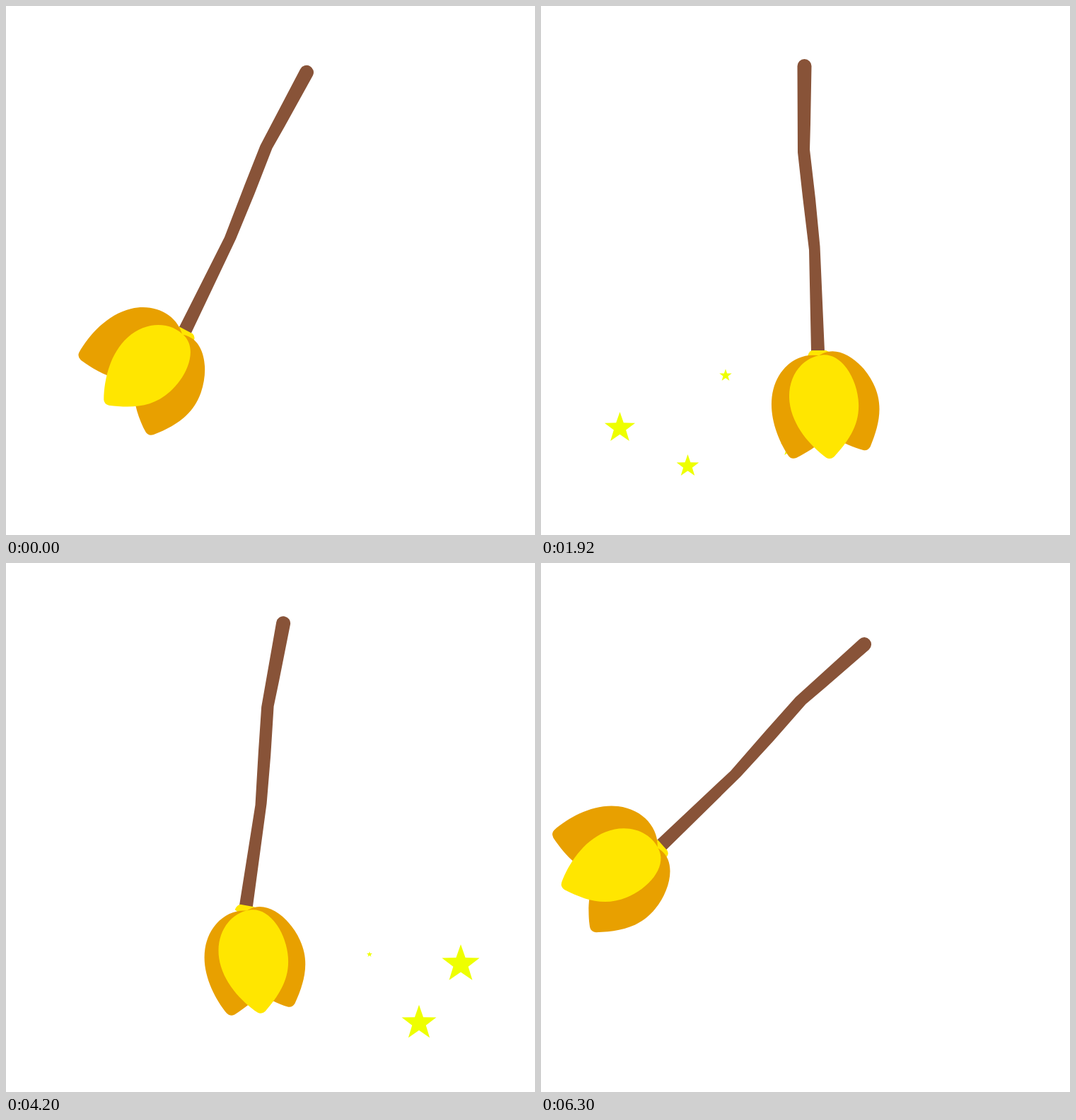
Recreate the animation shown at these times as an HTML page. Size 748x748 px, loop 6.42 s.

```html
<!DOCTYPE html>
<html lang="en">
<head>
<meta charset="utf-8">
<title>Sweeping broom</title>
<style>
  html, body { margin: 0; width: 100%; height: 100%; overflow: hidden; background: #fff; }
  svg { display: block; width: 100vw; height: 100vh; }
</style>
</head>
<body>
<svg viewBox="0 0 748 748">
  <defs>
    <path id="petal" d="M5 4C-24 4-48 30-48 65C-48 99-25 131-5 149Q0 153 6 149C30 128 49 106 49 72C49 38 31 4 5 4Z"/>
  </defs>
  <g id="stars" fill="#eeff00"></g>
  <g id="broom">
    <path fill="#885338" d="M362.5 85A10 10 0 0 1 382.5 85L381 167L380 203L388 272L394.5 340L401 488.500H382L379 345L370 270L363 207Z"/>
    <path fill="#ffe600" d="M383 487H403Q409 489 409 495L400 500H386L377 496Q378 489 383 487Z"/>
    <g transform="translate(392 490)">
      <use id="left" href="#petal" fill="#e8a000"/>
      <use id="right" href="#petal" fill="#e8a000"/>
      <use id="middle" href="#petal" fill="#ffe600"/>
    </g>
  </g>
</svg>
<script>
const LOOP = 6420, SWING = 16;

// Degrees for each step of one swing; positive is to the right.
const handle = [-27.9, -18, -9, 0, 12.5, 25.5, 33.5, 37.7, 39.1, 15, -10.2, -27.9, -38, -44, -47, -48];
const bristles = [-20.3, -13, -4, 6.3, 16, 24, 29.5, 32, 32, 26, 18.3, 10, 0, -9, -16, -20];

// x, y, step at which the star is largest
const stars = [
  [111.5, 594.5, 4.4], [207.5, 649, 5], [261, 521.5, 5.6], [353, 621.5, 5.15],
  [514, 553, 7.03], [584, 648, 9], [643, 564.5, 10.55]
];

const $ = id => document.getElementById(id);
const turn = (id, deg, rest = '') => $(id).setAttribute('transform', `rotate(${-deg}${rest}`);

function starPath() {
  const points = Array.from({ length: 10 }, (_, i) => {
    const r = i % 2 ? 0.4 : 1, a = i * Math.PI / 5;
    return `${(r * Math.sin(a)).toFixed(3)} ${(0.0955 - r * Math.cos(a)).toFixed(3)}`;
  });
  return `M${points.join('L')}Z`;
}

const starNodes = stars.map(() => {
  const node = document.createElementNS('http://www.w3.org/2000/svg', 'path');
  node.setAttribute('d', starPath());
  return $('stars').appendChild(node);
});

// Steps last 120, 90 and 90 ms in turn.
function stepAt(ms) {
  const rest = ms % 300;
  return 3 * Math.floor(ms / 300) + (rest >= 120) + (rest >= 210);
}

function draw(step) {
  const phase = step % SWING, bend = bristles[phase];
  const spread = 22.4 - 0.32 * bend;
  turn('broom', handle[phase], ' 381 195)');
  turn('left', bend - spread, ') scale(1.02)');
  turn('right', bend + spread, ') scale(1.02)');
  turn('middle', bend, ')');

  stars.forEach(([x, y, peak], i) => {
    const d = Math.abs(phase - peak) / 3.27;
    const size = d < 1 ? 29 * Math.cos(d * Math.PI / 2) : 0;
    starNodes[i].setAttribute('transform', `translate(${x} ${y}) scale(${size})`);
  });
}

function tick() {
  draw(stepAt(performance.now() % LOOP));
  requestAnimationFrame(tick);
}
tick();
</script>
</body>
</html>
```
